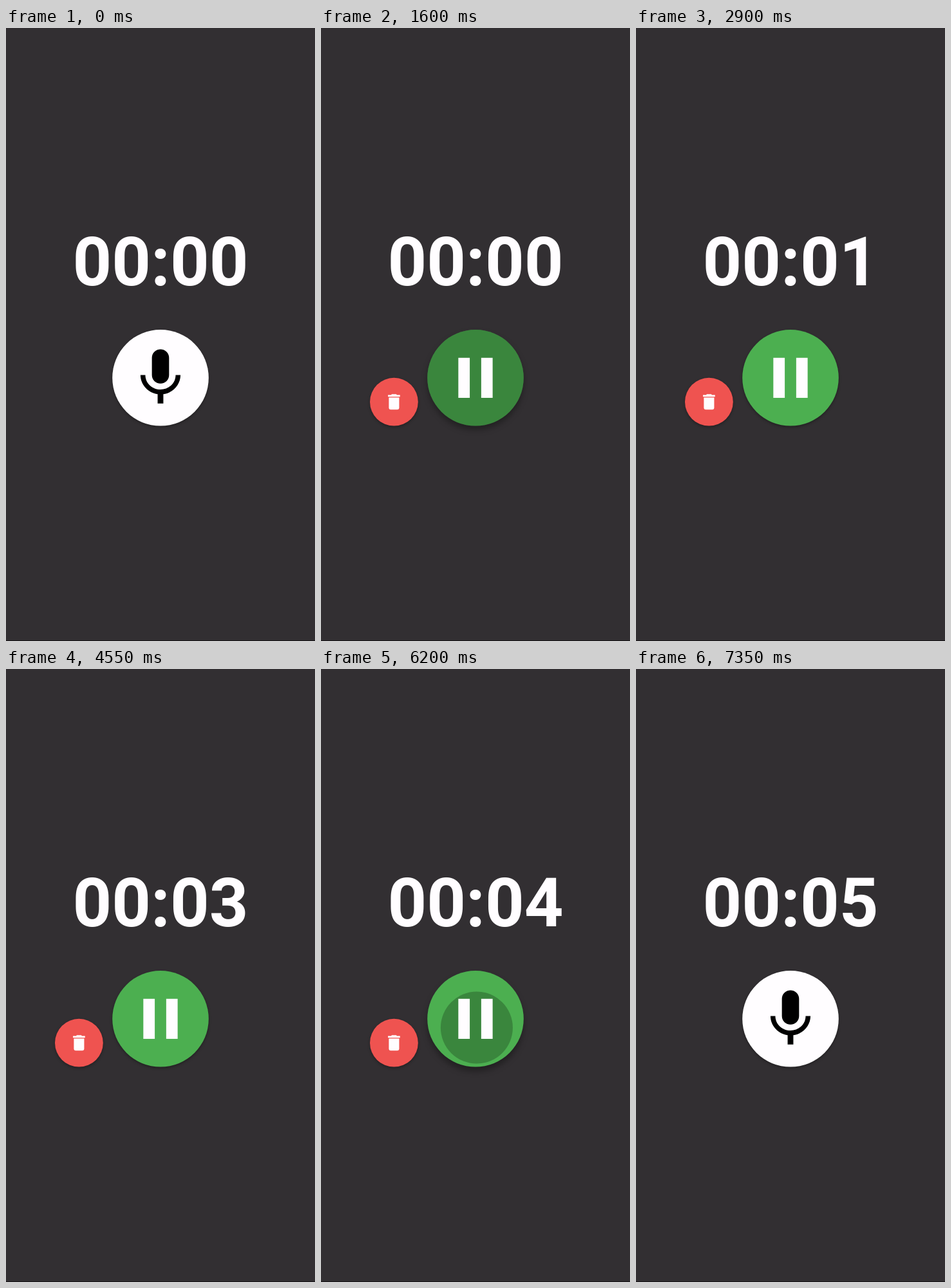
An HTML page that plays this animation: 480x953 px, repeating every 8 s.

```html
<!DOCTYPE html>
<html lang="en">
<head>
<meta charset="utf-8">
<title>Voice recorder</title>
<style>
  html, body { margin: 0; width: 100%; height: 100%; overflow: hidden; background: #322f32; }
  svg { display: block; width: 100%; height: 100%; }
  text { font: bold 106px Roboto, sans-serif; text-anchor: middle; fill: #fffdff; }
  #discard circle { filter: drop-shadow(0 2px 2px rgba(0, 0, 0, .3)); }
</style>
</head>
<body>
<svg viewBox="0 0 480 953">
  <clipPath id="disc"><circle cx="240" cy="543.8" r="74.8"/></clipPath>
  <rect width="480" height="953" fill="#322f32"/>
  <rect y="952" width="480" height="1" fill="#171517"/>
  <text id="clock" x="240" y="400">00:00</text>

  <g id="discard">
    <circle cx="113.4" cy="581.2" r="37.4" fill="#ef5350"/>
    <path transform="translate(97.4 565.2) scale(1.335)" fill="#fffdff"
      d="M6 19c0 1.1.9 2 2 2h8c1.1 0 2-.9 2-2V7H6v12zM19 4h-3.5l-1-1h-5l-1 1H5v2h14V4z"/>
  </g>

  <circle id="button" cx="240" cy="543.8" r="74.8"/>
  <g clip-path="url(#disc)"><circle id="ripple"/></g>
  <g transform="translate(186.7 490.6) scale(4.44)">
    <path id="mic" d="M12 14c1.66 0 3-1.34 3-3V5c0-1.66-1.34-3-3-3S9 3.34 9 5v6c0 1.66 1.34 3 3 3zm5.3-3c0 3-2.54 5.1-5.3 5.1S6.7 14 6.7 11H5c0 3.41 2.72 6.23 6 6.72V21h2v-3.28c3.28-.48 6-3.3 6-6.72h-1.7z"/>
    <path id="pause" fill="#fffdff" d="M6 19h4V5H6zM14 5v14h4V5z"/>
  </g>
</svg>
<script>
  const LOOP = 8000;
  const RECORDING = { start: 1600, end: 6750 };
  const FIRST_TICK = 2600, TICK = 965;
  const PRESSES = [
    { down: 350, up: 1600, faded: 2050 },
    { down: 6050, up: 7030, faded: 7350 },
  ];
  const CENTER = { x: 240, y: 543.8 }, TOUCH = { x: 244, y: 573 };

  const el = id => document.getElementById(id);
  const [clock, discard, button, ripple, mic, pause] =
    ['clock', 'discard', 'button', 'ripple', 'mic', 'pause'].map(el);
  const progress = (t, from, to) => Math.min(1, Math.max(0, (t - from) / (to - from)));
  const mix = (a, b, k) => a + (b - a) * k;
  const show = (node, visible) => node.setAttribute('visibility', visible ? 'visible' : 'hidden');

  function drawPress(t) {
    const { down, up, faded } = PRESSES.findLast(p => t >= p.down) || PRESSES[0];
    const grow = 1 - (1 - progress(t, down + 10, down + 460)) ** 2;
    const alpha = progress(t, down - 20, down + 55) * (1 - progress(t, up + 20, faded));
    ripple.setAttribute('r', 106 * grow);
    ripple.setAttribute('cx', mix(TOUCH.x, CENTER.x, grow));
    ripple.setAttribute('cy', mix(TOUCH.y, CENTER.y, grow));
    ripple.setAttribute('fill-opacity', 0.235 * alpha);

    const lift = progress(t, down, down + 100) * (1 - progress(t, up, up + 120));
    button.style.filter =
      `drop-shadow(0 ${mix(2.5, 7, lift)}px ${mix(2, 5, lift)}px rgba(0,0,0,.32))`;
  }

  function draw(t) {
    const recording = t >= RECORDING.start && t < RECORDING.end;
    const seconds = Math.min(5, Math.max(0, Math.floor((t - FIRST_TICK) / TICK) + 1));
    clock.textContent = '00:0' + seconds;
    button.setAttribute('fill', recording ? '#4caf50' : '#fffdff');
    show(discard, recording);
    show(pause, recording);
    show(mic, !recording);
    drawPress(t);
  }

  const begin = performance.now();
  function frame() {
    draw((performance.now() - begin) % LOOP);
    requestAnimationFrame(frame);
  }
  frame();
</script>
</body>
</html>
```
